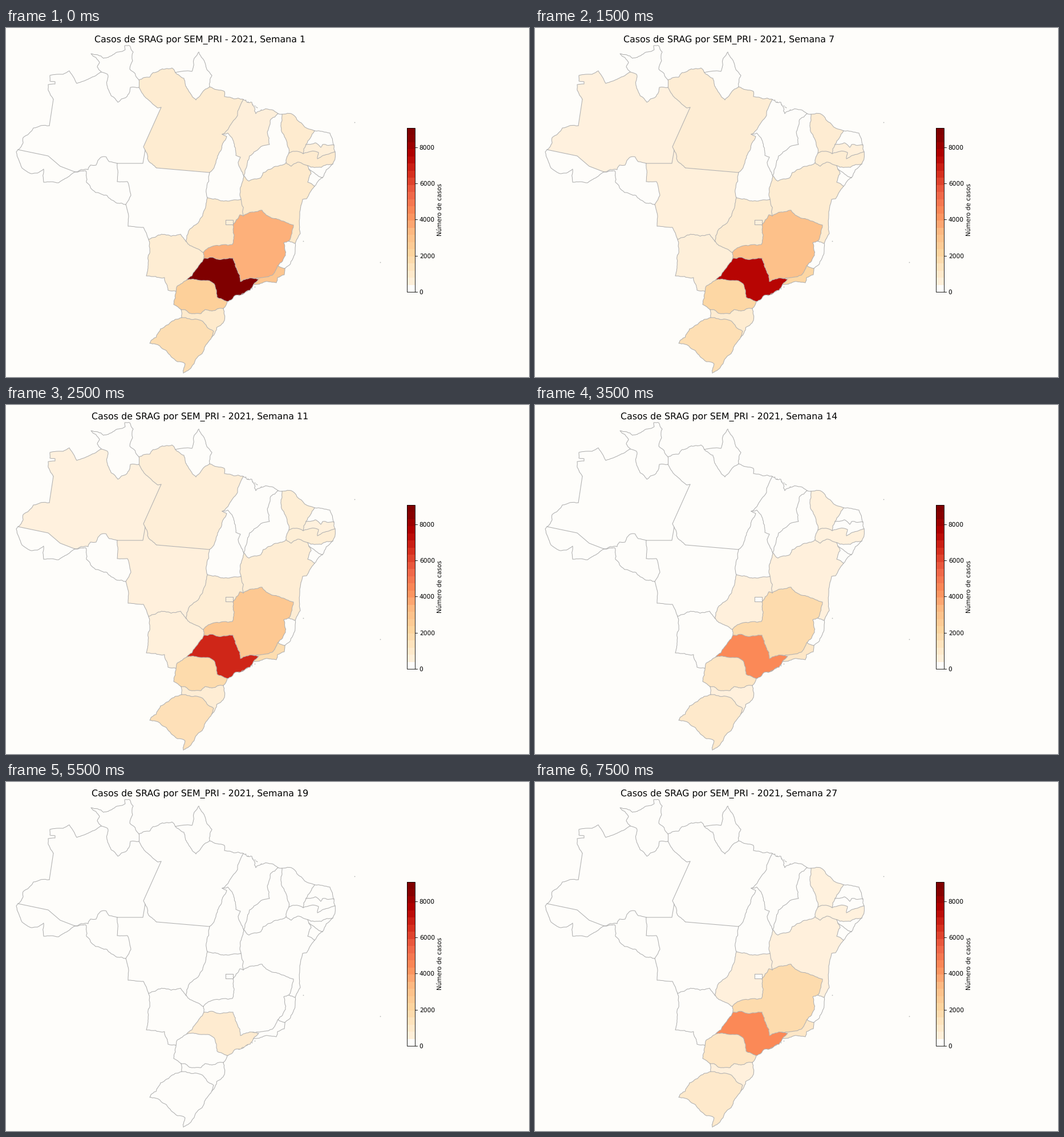
A matplotlib script that plays this animation: 917x611 px, repeating every 8 s.

```python
import math
import random

import matplotlib.pyplot as plt
import numpy as np
from matplotlib.animation import FuncAnimation
from matplotlib.collections import LineCollection
from matplotlib.patches import Polygon, Rectangle

W, H, DPI = 917, 611, 64
PT = W / 12 / DPI  # one point of a 12-inch-wide figure
PAPER, LINE = "#fefdfa", "#b0b0b0"
TOP, BLANK_BELOW, BANDS = 9060, 450, 23
CMAP = plt.get_cmap("OrRd")

plt.rcParams.update({"font.family": "DejaVu Sans", "font.size": 10 * PT,
                     "text.hinting": "none"})
fig = plt.figure(figsize=(W / DPI, H / DPI), dpi=DPI, facecolor=PAPER)
ax = fig.add_axes([0, 0, 1, 1])
ax.set(xlim=(0, W), ylim=(H, 0))
ax.axis("off")

rng = random.Random(21)
arcs = []


def ragged(a, b, rough):
    """Midpoint displacement from a to b, without the end point."""
    dx, dy = b[0] - a[0], b[1] - a[1]
    if math.hypot(dx, dy) < 4 or not rough:
        return [a]
    off = rng.uniform(-rough, rough)
    mid = ((a[0] + b[0]) / 2 - dy * off, (a[1] + b[1]) / 2 + dx * off)
    return ragged(a, mid, rough) + ragged(mid, b, rough)


def border(states, *pts, rough=0.11):
    """Register one line shared by the given states."""
    path = []
    for a, b in zip(pts, pts[1:]):
        path += ragged(a, b, rough)
    arcs.append((states.split(), path + [pts[-1]]))


def ring(state):
    """Chain all lines of a state into one closed outline."""
    parts = [p for names, p in arcs if state in names]
    out = list(parts.pop(0))
    while parts:
        _, i, end = min((math.dist(out[-1], p[end]), i, end)
                        for i, p in enumerate(parts) for end in (0, -1))
        part = parts.pop(i)
        out += part if end == 0 else part[::-1]
    return out


# North
border("RR", (167, 77), (160, 68), (164, 60), (149, 45), (171, 53), (187, 47),
       (209, 38), (208, 31), (217, 31), (223, 42), (217, 72), (233, 91))
border("RR AM", (167, 77), (178, 81), (184, 118), (196, 130), (211, 121),
       (218, 104), (233, 104))
border("RR PA", (233, 91), (233, 104), rough=0)
border("AM", (167, 77), (124, 97), (111, 75), (100, 81), (77, 83), (77, 93),
       (86, 94), (86, 98), (74, 99), (74, 109), (83, 125), rough=0.05)
border("AM", (83, 125), (76, 171), rough=0)
border("AM", (76, 171), (48, 175), (30, 192), (30, 200), (21, 213))
border("AM PA", (233, 104), (242, 119), (266, 140), (272, 139), rough=0.05)
border("AM PA", (272, 139), (241, 208), (244, 214), rough=0)
border("AM MT", (244, 214), (240, 237), (195, 237), rough=0)
border("AM AC", (21, 213), (74, 224), (95, 242), (121, 252), rough=0)
border("AM RO", (121, 252), (144, 248), (148, 240), (158, 240), (167, 226),
       (176, 226), (181, 234), (195, 237))
border("AC", (21, 213), (18, 217), (28, 245), (44, 255), (55, 254), (66, 247),
       (66, 270), (92, 271), (121, 252), rough=0.06)
border("RO", (121, 252), (140, 250), (141, 270), (157, 288), (193, 306), (210, 309))
border("RO MT", (195, 237), (195, 269), (213, 269), (219, 293), (210, 309), rough=0.05)
border("PA", (233, 91), (252, 86), (258, 78), (291, 70), (297, 78))
border("PA AP", (297, 78), (312, 88), (314, 97), (333, 126), (344, 113), (357, 103))
border("AP", (297, 78), (326, 76), (338, 42), (353, 74), (361, 83), (357, 103))
border("PA", (357, 103), (370, 108), (383, 111), (383, 120), (416, 125))
border("PA MA", (416, 125), (406, 153), (389, 178), (379, 186))
border("PA TO", (379, 186), (387, 190), (371, 224), (357, 253))
border("PA MT", (357, 253), (264, 245), rough=0)
border("PA MT", (264, 245), (250, 233), (244, 214))

# Northeast
border("MA", (416, 125), (431, 130), (438, 150), (443, 146), (452, 143),
       (477, 150), rough=0.2)
border("MA TO", (379, 186), (389, 184), (396, 192), (403, 223), (411, 226),
       (407, 235), (417, 259))
border("MA PI", (477, 150), (464, 160), (462, 204), (427, 224), (417, 259))
border("PI", (477, 150), (484, 151))
border("PI CE", (484, 151), (488, 190), (496, 219))
border("PI PE", (496, 219), (492, 228), (491, 236))
border("PI BA", (417, 259), (426, 268), (447, 262), (451, 253), (491, 236))
border("CE", (484, 151), (502, 151), (541, 180))
border("CE RN", (541, 180), (526, 204))
border("CE PB", (526, 204), (521, 220))
border("CE PE", (496, 219), (506, 216), (521, 220))
border("RN", (541, 180), (568, 184), (575, 205))
border("RN PB", (575, 205), (555, 204), (552, 209), (543, 201), (526, 204))
border("PB", (575, 205), (577, 217))
border("PB PE", (577, 217), (546, 229), (548, 218), (521, 220))
border("PE", (577, 217), (573, 238))
border("PE AL", (573, 238), (553, 244), (529, 241))
border("PE BA", (491, 236), (500, 242), (511, 235), (529, 241))
border("AL BA", (529, 241), (531, 247))
border("AL", (573, 238), (555, 262))
border("AL SE", (555, 262), (531, 247))
border("SE BA", (531, 247), (535, 255), (529, 270), (541, 277))
border("SE", (555, 262), (541, 277))
border("BA", (541, 277), (527, 299), (520, 300), (516, 360), (507, 377), rough=0.06)
border("BA TO", (412, 300), (411, 279), (417, 259))
border("BA GO", (412, 300), (416, 329))
border("BA MG", (416, 329), (449, 319), (486, 338), (504, 345), (496, 373))
border("BA ES", (507, 377), (496, 373))

# Centre-west
border("MT TO", (357, 253), (351, 283), (353, 297))
border("MT GO", (353, 297), (345, 328), (321, 354), (316, 374))
border("MT", (210, 309), (215, 330), (214, 347), (241, 349), (250, 370), rough=0.05)
border("MT MS", (250, 370), (273, 361), (306, 361), (316, 374))
border("TO GO", (353, 297), (371, 300), (388, 303), (412, 300))
border("GO MG", (416, 329), (410, 327), (398, 345), (397, 379), (366, 381), (346, 393))
border("GO MS", (316, 374), (346, 393))
border("DF", (385, 336), (398, 336), (398, 344), (385, 344), (385, 336), rough=0)
border("MS MG", (346, 393), (347, 403))
border("MS SP", (347, 403), (332, 424), (317, 441))
border("MS PR", (317, 441), (300, 452), (298, 461))
border("MS", (250, 370), (246, 434), (278, 437), (284, 459), (298, 461))

# Southeast
border("MG SP", (347, 403), (372, 405), (398, 403), (411, 444), (433, 438))
border("MG RJ", (433, 438), (468, 432), (477, 416))
border("MG ES", (477, 416), (490, 398), (487, 376), (496, 373))
border("ES RJ", (477, 416), (489, 421))
border("ES", (507, 377), (507, 391), (489, 421))
border("RJ SP", (433, 438), (443, 440), (434, 449))
border("RJ", (434, 449), (474, 446), (476, 437), (488, 432), (489, 421))
border("SP", (434, 449), (428, 459), (402, 468), (388, 479))

# South
border("SP PR", (388, 479), (370, 471), (365, 448), (335, 441), (317, 441))
border("PR", (388, 479), (381, 491))
border("PR", (298, 461), (294, 484), (307, 493))
border("PR SC", (307, 493), (342, 500), (349, 493), (381, 491))
border("SC", (381, 491), (383, 512), (361, 541))
border("SC", (307, 493), (308, 507))
border("SC RS", (308, 507), (335, 510), (347, 516), (364, 531), (361, 541))
border("RS", (308, 507), (297, 510), (252, 552), (270, 557), (314, 588), (311, 604))
border("RS", (361, 541), (344, 570), (325, 594), (311, 604))

# Cases at the height of the wave, and their drift per step at the start
PEAK_CASES = {
    "SP": (TOP, 0), "MG": (3650, 0), "RJ": (2900, -150), "PR": (2450, 0),
    "RS": (1700, 80), "SC": (1000, 0), "GO": (1000, 0), "BA": (1000, 0),
    "CE": (950, 0), "PE": (930, 0), "PA": (870, 0), "MS": (800, -25),
    "DF": (650, 0), "PB": (620, 0), "MA": (600, -60), "MT": (440, 60),
    "AM": (350, 60),
}


def cases(state, i):
    wave = np.interp(i, [0, 2, 4, 7, 11, 13, 15],
                     [1, 0.82, 0.905, 0.513, 0.1, 0.254, 0.513])
    peak, drift = PEAK_CASES[state]
    return (peak + drift * min(i, 4)) * wave


def tone(n):
    return PAPER if n < BLANK_BELOW else CMAP(n / TOP)


shapes = {s: ax.add_patch(Polygon(ring(s), fc=PAPER, ec="none"))
          for s in PEAK_CASES}
shapes["DF"].set_zorder(1.5)
ax.add_collection(LineCollection([p for _, p in arcs], colors=LINE,
                                 linewidths=PT, capstyle="round"))

# Far islands, then islets scattered along two stretches of coast
dots = [(611, 164.5), (655.5, 410), (521, 373)]
for (x0, y0), (x1, y1) in [((418, 125), (450, 145)), ((407, 468), (444, 449))]:
    for _ in range(7):
        t = rng.random()
        dots.append((x0 + (x1 - x0) * t, y0 + (y1 - y0) * t))
ax.plot(*zip(*dots), "o", ms=1.6 * PT, mfc=LINE, mec="none")

# Colour scale
LEFT, BASE, TALL = 703, 462, 287
WIDE = TALL / 20
for k in range(BANDS):
    low, high = (round(BASE - TALL * j / BANDS) for j in (k, k + 1))
    color = tone((k + 0.5) / (BANDS - 1) * TOP)
    ax.add_patch(Rectangle((LEFT, high), WIDE, low - high, fc=color,
                           ec="none", antialiased=False))
ax.add_patch(Rectangle((LEFT, BASE - TALL), WIDE, TALL, fc="none", ec="black",
                       lw=0.8 * PT))
for value in range(0, 8001, 2000):
    y = BASE - value / TOP * TALL
    x = LEFT + WIDE
    ax.plot([x, x + 3.7], [y, y], color="black", lw=0.8 * PT)
    ax.text(x + 7.4, y + 3.9, str(value), va="baseline")
ax.text(763.5, 318, "Número de casos", rotation=90, rotation_mode="anchor",
        ha="center", va="baseline")

title = ax.text(340, 24, "", size=15 * PT, ha="center", va="baseline")


def update(i):
    for state in PEAK_CASES:
        shapes[state].set_facecolor(tone(cases(state, i)))
    week = round(np.interp(i, [0, 5, 11, 15], [1, 11, 19, 27]))
    title.set_text(f"Casos de SRAG por SEM_PRI - 2021, Semana {week}")
    return [title, *shapes.values()]


anim = FuncAnimation(fig, update, frames=16, interval=500,
                     repeat=True, repeat_delay=0, blit=False)
plt.show()
```
